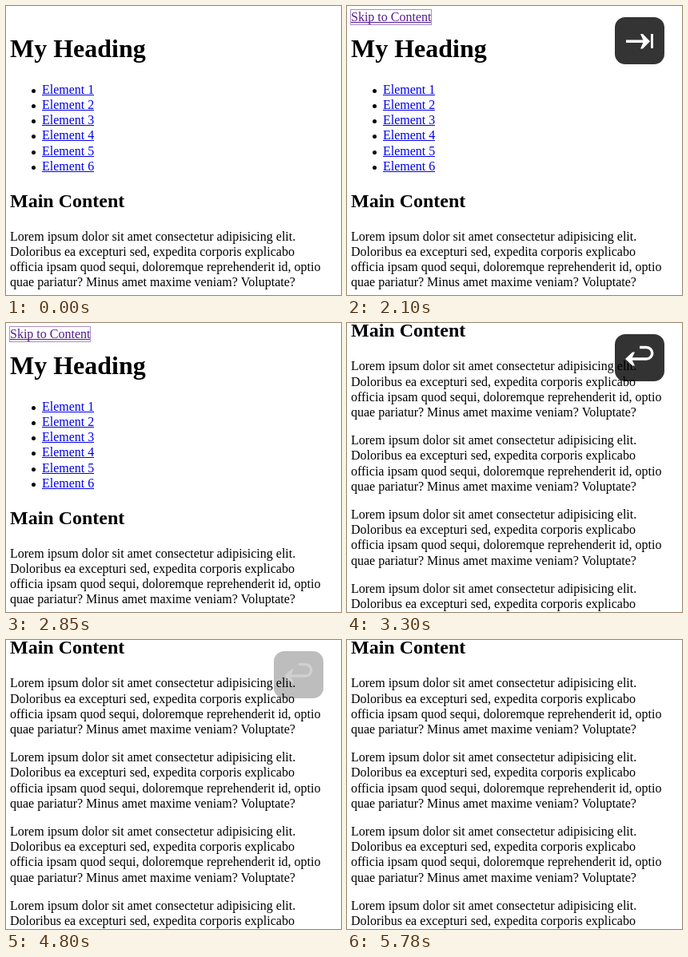
These frames come from a looping animation (419x362 px, 6330 ms). An HTML page with a canvas:

```html
<!DOCTYPE html>
<html lang="en">
<head>
<meta charset="utf-8">
<title>Skip link</title>
<style>
  html, body { margin: 0; width: 100%; height: 100%; overflow: hidden; background: #fff; }
  canvas { display: block; }
</style>
</head>
<body>
<canvas id="stage" width="419" height="362"></canvas>
<script>
const ctx = document.getElementById('stage').getContext('2d');
const W = 419, H = 362, LOOP = 6330;
const LEFT = 5, LINE = 19.2, PARAGRAPH = 4 * LINE + 16, SCROLL = 234.4;
const BLUE = '#0000ee', VISITED = '#551a8b';
const LOREM = [
  'Lorem ipsum dolor sit amet consectetur adipisicing elit.',
  'Doloribus ea excepturi sed, expedita corporis explicabo',
  'officia ipsam quod sequi, doloremque reprehenderit id, optio',
  'quae pariatur? Minus amet maxime veniam? Voluptate?'
];

function text(str, x, y, size = 16, weight = 'normal', color = '#000') {
  ctx.font = `${weight} ${size}px "Liberation Serif", Times, serif`;
  ctx.fillStyle = color;
  ctx.fillText(str, x, Math.round(y));
}

function link(str, x, y, color) {
  text(str, x, y, 16, 'normal', color);
  ctx.fillRect(x, Math.round(y) + 1, Math.round(ctx.measureText(str).width), 1);
}

function page(scroll) {
  text('My Heading', LEFT, 64 - scroll, 32, 'bold');
  for (let i = 0; i < 6; i++) {
    const y = Math.round(109.8 + i * LINE - scroll);
    link(`Element ${i + 1}`, 45, y, BLUE);
    ctx.fillStyle = '#000';
    ctx.beginPath();
    ctx.arc(34.5, y - 3.5, 2.5, 0, Math.PI * 2);
    ctx.fill();
  }
  text('Main Content', LEFT, 251.6 - scroll, 24, 'bold');
  for (let p = 0; p < 4; p++) {
    LOREM.forEach((str, i) =>
      text(str, LEFT, 293.8 + p * PARAGRAPH + i * LINE - scroll));
  }
}

function skipLink() {
  link('Skip to Content', LEFT, 19, VISITED);
  ctx.strokeStyle = VISITED;
  ctx.lineWidth = 1;
  ctx.setLineDash([1, 1]);
  ctx.strokeRect(4.5, 4.5, 101, 19);
  ctx.setLineDash([]);
}

function keycap(fill, ink, symbol) {
  ctx.fillStyle = fill;
  ctx.beginPath();
  ctx.roundRect(335, 14, 62, 59, 13);
  ctx.fill();
  ctx.fillStyle = ctx.strokeStyle = ink;
  ctx.lineWidth = 3.5;
  symbol();
}

function tabSymbol() {
  ctx.fillRect(349, 42.5, 25, 3.5);
  ctx.fill(new Path2D('M367 35H370L379 44.2L370 53.5H367L371 44.2Z'));
  ctx.fillRect(380, 35, 3, 18);
}

function enterSymbol() {
  ctx.stroke(new Path2D('M366 30.5H374.5A7.2 7.2 0 0 1 374.5 45H352'));
  ctx.fill(new Path2D('M348 45L357 36.5H360L356 45L360 53.5H357Z'));
}

function draw(t) {
  ctx.fillStyle = '#fff';
  ctx.fillRect(0, 0, W, H);
  page(t < 3300 ? 0 : SCROLL);
  if (t >= 1200 && t < 3300) skipLink();

  if (t >= 1200 && t < 2700) keycap('#333433', '#fff', tabSymbol);
  else if (t >= 2700 && t < 2850) keycap('#cac8cd', '#d8d7d5', tabSymbol);
  else if (t >= 3300 && t < 4800) keycap('rgba(0,0,0,.8)', '#fff', enterSymbol);
  else if (t >= 4800 && t < 4950) keycap('rgba(0,0,0,.26)', '#d0d0d0', enterSymbol);
}

const start = performance.now();
function tick() {
  draw((performance.now() - start) % LOOP);
  requestAnimationFrame(tick);
}
tick();
</script>
</body>
</html>
```
